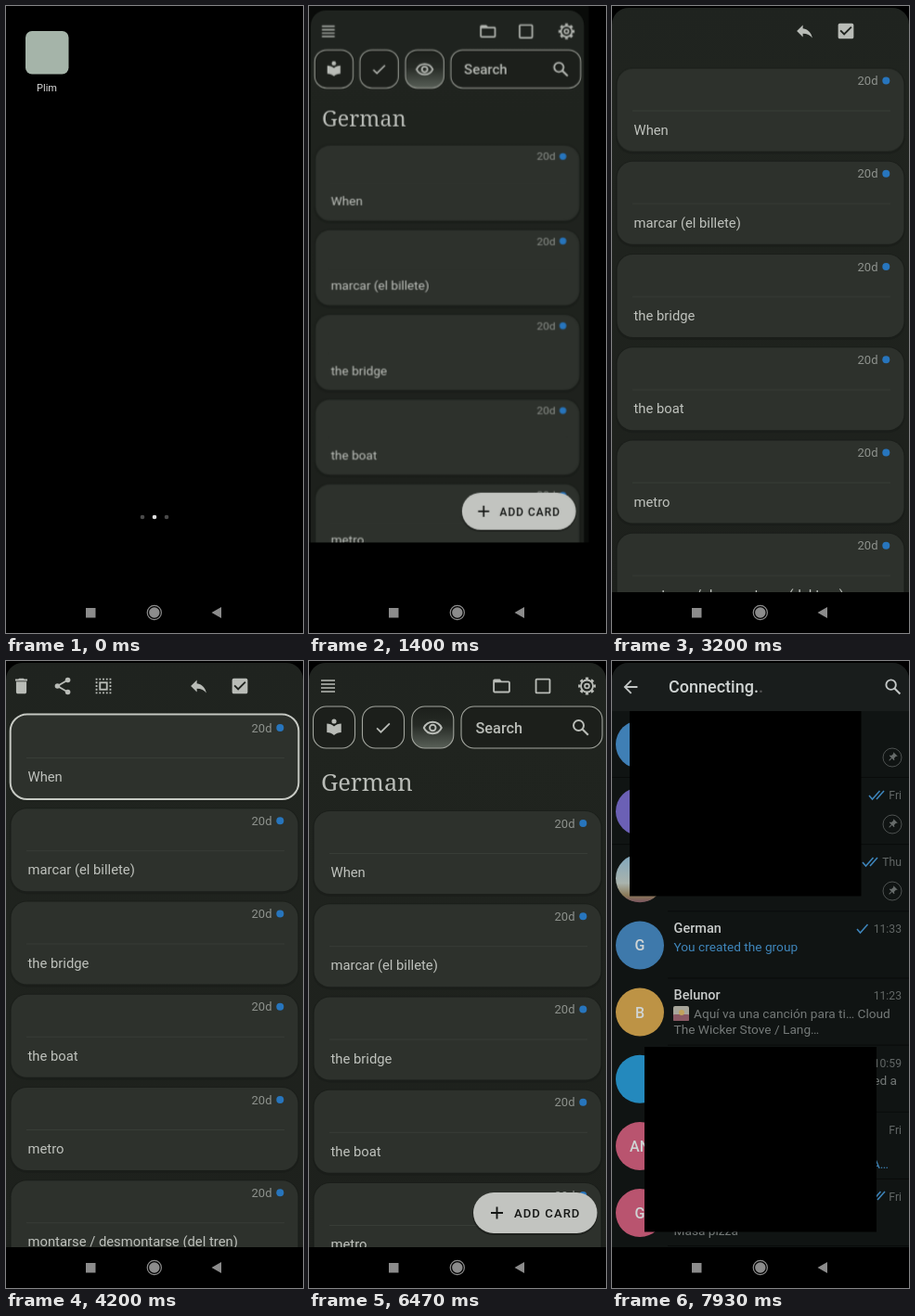
Write an HTML page that moves like this. It is 320 by 676 pixels and loops after 8000 ms.

```html
<!DOCTYPE html>
<html lang="en">
<head>
<meta charset="utf-8">
<title>Flashcards</title>
<style>
html, body { margin: 0; width: 100%; height: 100%; overflow: hidden; background: #000; }
svg { display: block; width: 100%; height: 100%; font-family: Roboto, sans-serif; }

/* 1% of the loop is 80 ms */
.a { animation: 8s linear infinite both; }
#home { transform-origin: 160px 338px; animation-name: home; }
#launcher { animation-name: launcher; }
#app { animation-name: open; }
#frame { animation-name: frame; }
.rule { animation-name: rule; }
#list { animation-name: scroll; animation-timing-function: ease-in-out; }
#header { animation-name: header; }
#selectBar { animation-name: selectBar; }
#actions, #pick0 { animation-name: first; }
#pick1 { animation-name: second; }
#scrim { animation-name: scrim; }
#sheet { animation-name: sheet; }
#shareItems { animation-name: items; }
#masks { animation-name: masks; }
#chat { animation-name: chat; }
#launchTap { animation-name: launchTap; }
.tap { opacity: 0; animation: tap 8s linear infinite; }

@keyframes home {
  0%, 11.6% { transform: scale(1); opacity: 1; }
  14.1% { transform: scale(.915); opacity: .68; }
  20%, 100% { transform: scale(.88); opacity: 0; }
}
@keyframes launcher { 0%, 11.6% { opacity: 1; } 12.4%, 100% { opacity: 0; } }
@keyframes open {
  0%, 11.6% { transform: translate(22px, 28px) scale(.14, .073); opacity: 0; }
  12.4% { opacity: 1; }
  14.1% { transform: translate(7.8px, 11.2px) scale(.66, .622); animation-timing-function: ease-out; }
  20%, 100% { transform: translate(0, 0) scale(1, 1); opacity: 1; }
}
@keyframes frame { 0%, 14.2% { opacity: 1; } 20%, 100% { opacity: 0; } }
@keyframes rule { 0%, 23.4% { opacity: .3; } 29%, 100% { opacity: 1; } }
@keyframes scroll {
  0%, 34.5% { transform: translateY(0); }
  41.4%, 74.6% { transform: translateY(-103px); }
  80%, 100% { transform: translateY(0); }
}
@keyframes header {
  0%, 34% { opacity: 1; }
  37.5%, 76% { opacity: 0; }
  80%, 100% { opacity: 1; }
}
@keyframes selectBar { 0%, 35% { opacity: 0; } 39%, 74.6% { opacity: 1; } 77%, 100% { opacity: 0; } }
@keyframes first { 0%, 49.2% { opacity: 0; } 52.2%, 74.3% { opacity: 1; } 76%, 100% { opacity: 0; } }
@keyframes second { 0%, 61.7% { opacity: 0; } 65.5%, 74.3% { opacity: 1; } 76%, 100% { opacity: 0; } }
@keyframes scrim { 0%, 81.6% { opacity: 0; } 84.1%, 100% { opacity: .62; } }
@keyframes sheet {
  0%, 81.6% { transform: translateY(325px); animation-timing-function: ease-out; }
  84.1%, 100% { transform: translateY(0); }
}
@keyframes items { 0%, 85% { opacity: 0; } 88.8%, 100% { opacity: 1; } }
@keyframes masks { 0%, 85% { opacity: 0; } 87.5%, 100% { opacity: 1; } }
@keyframes chat {
  0%, 93.4% { opacity: 0; transform: translateY(24px); animation-timing-function: ease-out; }
  98.8%, 100% { opacity: 1; transform: translateY(0); }
}
@keyframes launchTap { 0%, .8% { opacity: 0; } 2.5%, 14.2% { opacity: 1; } 16%, 100% { opacity: 0; } }
@keyframes tap { 0% { opacity: 0; } .6%, 1.8% { opacity: .8; } 3%, 100% { opacity: 0; } }
</style>
</head>
<body>
<svg id="stage" viewBox="0 0 320 676" preserveAspectRatio="none"></svg>
<script>
const INK = '#b9bcb7';

const rect = (x, y, w, h, r, fill, extra = '') =>
  `<rect x="${x}" y="${y}" width="${w}" height="${h}" rx="${r}" fill="${fill}" ${extra}/>`;
const disc = (x, y, r, fill, extra = '') =>
  `<circle cx="${x}" cy="${y}" r="${r}" fill="${fill}" ${extra}/>`;
const line = (d, stroke, width, extra = '') =>
  `<path d="${d}" fill="none" stroke="${stroke}" stroke-width="${width}" ${extra}/>`;
const label = (text, x, y, size, fill, extra = '') =>
  `<text x="${x}" y="${y}" font-size="${size}" fill="${fill}" ${extra}>${text}</text>`;
const END = 'text-anchor="end"';
const MIDDLE = 'text-anchor="middle"';
const BOLD = 'font-weight="500"';

// Icons live on a 24-unit grid and inherit their colour.
const fill = d => `<path d="${d}"/>`;
const pen = 'currentColor';
const icons = {
  folder: fill('M20 6h-8l-2-2H4c-1.1 0-2 .9-2 2v12c0 1.1.9 2 2 2h16c1.1 0 2-.9 2-2V8c0-1.1-.9-2-2-2zm0 12H4V8h16z'),
  box: rect(4, 4, 16, 16, 1, 'none', `stroke="${pen}" stroke-width="2"`),
  checked: fill('M19 3H5c-1.1 0-2 .9-2 2v14c0 1.1.9 2 2 2h14c1.1 0 2-.9 2-2V5c0-1.1-.9-2-2-2zm-9 14l-5-5 1.4-1.4 3.6 3.6 7.6-7.6L19 8z'),
  gear: disc(12, 12, 7, 'none', `stroke="${pen}" stroke-width="2"`) +
    disc(12, 12, 8.8, 'none', `stroke="${pen}" stroke-width="2.6" pathLength="64" stroke-dasharray="4 4" stroke-dashoffset="2"`) +
    disc(12, 12, 2.6, 'none', `stroke="${pen}" stroke-width="1.9"`),
  book: fill('M12 11.5C9.6 9.3 6.5 8 3 8v11c3.5 0 6.6 1.3 9 3.5 2.4-2.2 5.5-3.5 9-3.5V8c-3.5 0-6.6 1.3-9 3.5z') + disc(12, 5, 3, pen),
  check: line('M4 12.5l5 5L20 6.5', pen, 2),
  eye: line('M2 12C4 7.8 7.700 5.500 12 5.500S20 7.800 22 12C20 16.200 16.300 18.500 12 18.500S4 16.200 2 12z', pen, 2) +
    disc(12, 12, 3.4, 'none', `stroke="${pen}" stroke-width="2"`),
  search: disc(9.5, 9.5, 5.5, 'none', `stroke="${pen}" stroke-width="2"`) + line('M13.500 13.500L19.800 19.800', pen, 2.2),
  trash: fill('M6 19c0 1.1.9 2 2 2h8c1.1 0 2-.9 2-2V7H6zM19 4h-3.500l-1-1h-5l-1 1H5v2h14z'),
  share: line('M18 5L6 12l12 7', pen, 2) + disc(18, 5, 3, pen) + disc(6, 12, 3, pen) + disc(18, 19, 3, pen),
  selectAll: rect(4, 4, 16, 16, 0, 'none', `stroke="${pen}" stroke-width="2" stroke-dasharray="2 2" stroke-dashoffset="1"`) +
    rect(8, 8, 8, 8, 0, 'none', `stroke="${pen}" stroke-width="2"`),
  reply: fill('M10 9V5l-7 7 7 7v-4.1c5 0 8.500 1.600 11 5.100-1-5-4-10-11-11z'),
  pin: `<g transform="rotate(45 12 12)">${fill('M16 9V4h1a1 1 0 0 0 0-2H7a1 1 0 0 0 0 2h1v5c0 1.700-1.300 3-3 3v2h6v7l1 1 1-1v-7h6v-2c-1.700 0-3-1.300-3-3z')}</g>`,
  back: fill('M20 11H7.800l5.600-5.600L12 4l-8 8 8 8 1.400-1.400L7.800 13H20z'),
};
const icon = (name, x, y, scale = .93, color = INK) =>
  `<g transform="translate(${x} ${y}) scale(${scale}) translate(-12 -12)" fill="${color}" color="${color}">${icons[name]}</g>`;

const touch = disc(0, 0, 15, '#fff', 'opacity=".12"') + disc(0, 0, 9.5, '#dfe3df', 'opacity=".62"');
const tap = (x, y, ms) =>
  `<g transform="translate(${x} ${y})"><g class="tap" style="animation-delay:${ms}ms">${touch}</g></g>`;

function home() {
  const dots = [147, 160, 173].map((x, i) => disc(x, 551, 2.3, i === 1 ? '#dedede' : '#4a4a4a')).join('');
  return `<g id="home" class="a">${dots}<g id="launcher" class="a">` +
    rect(21, 27, 46.5, 46.5, 7, '#a5b4a9') + label('Plim', 44, 92, 11, '#d8d8d8', MIDDLE) + '</g></g>';
}

function card(text, i) {
  const y = 162 + i * 100.25;
  const pick = i < 2
    ? `<g id="pick${i}" class="a">${rect(4.7, y - 1.5, 310.6, 91.5, 18, 'none', 'stroke="#c6c9c3" stroke-width="2"')}</g>` : '';
  return rect(4, y - 1, 312, 93, 19, '#191c18', 'opacity=".55"') +
    rect(5.5, y, 309, 89, 17, '#2d312c') +
    `<g class="rule a">${line(`M22 ${y + 45.5}H300`, '#383d37', 1)}</g>` +
    label('20d', 286.5, y + 17.5, 13, '#8e928d', END) + disc(295.3, y + 13, 4, '#2775bd') +
    label(text, 23.5, y + 71, 14.8, '#bfc2bd') + pick;
}

function header() {
  const menu = [21, 25, 29, 33].map(y => `M13 ${y}H28`).join('');
  const border = 'stroke="#a3a69f" stroke-width="1.1"';
  return '<g id="header" class="a">' + line(menu, INK, 1.5) +
    icon('folder', 207.5, 27) + icon('box', 252, 27) + icon('gear', 299.500, 27) +
    [4.5, 57.5, 110.8].map((x, i) => rect(x, 49, 45, 45, 14, i === 2 ? 'url(#glow)' : '#1c1f1b', border)).join('') +
    icon('book', 27, 71, .86) + icon('check', 80, 72, .86) + icon('eye', 133.300, 72, .95) +
    rect(164, 49, 152, 45, 14, '#1c1f1b', border) +
    label('Search', 179.5, 77.5, 16.3, INK, BOLD) + icon('search', 293, 72, 1) +
    label('German', 13, 139.5, 25.5, INK, 'font-family="\'Noto Serif\', serif" font-weight="300"') +
    rect(176, 574, 135, 45, 22.5, '#000', 'opacity=".3"') + rect(177, 573, 133.5, 44, 22, '#c2c4c0') +
    line('M196 595H209M202.500 588.500V601.500', '#151715', 1.9) +
    label('ADD CARD', 221, 600, 13.1, '#151715', BOLD + ' letter-spacing="1.05"') + '</g>';
}

function app() {
  const words = ['When', 'marcar (el billete)', 'the bridge', 'the boat', 'metro', 'montarse / desmontarse (del tren)'];
  return '<g id="app" class="a" clip-path="url(#window)">' +
    `<g id="frame" class="a">${rect(-6, -15, 332, 680, 16, '#171a16')}</g>` +
    rect(0, 2, 320, 660, 18, 'url(#wall)') +
    `<g id="list" class="a">${words.map(card).join('')}</g>` + header() +
    '<g id="selectBar" class="a">' + icon('reply', 207.500, 27) + icon('checked', 252, 27) +
    `<g id="actions" class="a">${icon('trash', 16.500, 27)}${icon('share', 61, 27)}${icon('selectAll', 105, 27)}</g></g></g>`;
}

function shareSheet() {
  const tile = (x, y, color) => rect(x - 20.5, y - 20.5, 41, 41, 10, color);
  const name = (text, x, y, anchor = '') => label(text, x, y, 11, '#9da2a3', anchor);
  return `<g id="scrim" class="a">${rect(0, 0, 320, 632, 0, '#000')}</g>` +
    '<g clip-path="url(#window)"><g id="sheet" class="a">' + rect(0, 310, 320, 345, 20, '#171b1d') +
    '<g id="shareItems" class="a">' + label('Share', 160, 351, 15.5, '#cfd3d4', BOLD + ' ' + MIDDLE) +
    tile(45.5, 392, '#d6d8d9') + disc(45.5, 392, 11, '#2b6fc4') +
    tile(121.3, 392, '#d6d8d9') + disc(121.3, 392, 17.5, '#2f9fd6') +
    tile(197, 392, '#d6d8d9') + rect(184, 379, 26, 26, 3, '#d99a45') +
    tile(273, 392, '#2fb646') +
    tile(45.5, 475.500, '#d6d8d9') + rect(30, 461, 30, 30, 2, '#eeb02c') +
    tile(273, 475.500, '#d6d8d9') + disc(273, 476, 15, '#2f7fe0') +
    name('Nimbus', 28.5, 432) + name('Send', 31.5, 444) + name('OurApp', 298, 432, END) +
    name('Copy', 23, 515) + name('Note', 287.5, 515, END) +
    rect(19, 565, 282, 42, 21, '#2a2d2c') + '</g></g></g>';
}

function chat() {
  const BLUE = '#3e86bd', GREY = '#626766', NAME = '#c9cccb';
  const avatars = [['#3f7fb5', ''], ['#6b60b5', ''], ['url(#photo)', ''], ['#3e79ab', 'G'],
    ['#bd9345', 'B'], ['#2489bd', ''], ['#b9546f', 'AN'], ['#b9546f', 'G']];
  const rows = avatars.map(([color, initials], i) => {
    const y = 90 + i * 72.15;
    return disc(30, y, 26, color) + label(initials, 30, y + 6, 16, '#cfd4d4', BOLD + ' ' + MIDDLE) +
      line(`M${i < 2 ? 0 : 60} ${y + 35.500}H320`, '#090b0a', 1);
  }).join('');
  const pins = [104, 176, 248].map(y =>
    disc(302, y, 10, 'none', 'stroke="#4d5150"') + icon('pin', 302, y, .5, '#666b6a')).join('');
  const tick = (x, y) => line(`M${x} ${y}l3.500 4 8-9`, BLUE, 1.5);
  const ticks = (x, y) => tick(x, y) + line(`M${x + 8} ${y + 4}l8-9`, BLUE, 1.5);
  const time = (text, y) => label(text, 312, y, 12.2, GREY, END);
  const note = (text, x, y, color = '#747978', extra = '') => label(text, x, y, 13.7, color, extra);
  return '<g clip-path="url(#window)"><g id="chat" class="a">' + rect(0, 2, 320, 680, 18, '#101413') +
    `<path d="M0 54V20a18 18 0 0 1 18-18H302a18 18 0 0 1 18 18V54z" fill="#191d1c"/>` +
    icon('back', 20, 28, .93, '#c3c7c6') + icon('search', 303, 28, .95, '#c3c7c6') +
    label('Connecting.<tspan fill="#555">.</tspan>', 61, 34, 18, '#d0d4d3', BOLD) +
    rows + pins + ticks(277, 145) + ticks(270, 217) + ticks(278, 577) + tick(264, 289) +
    time('Fri', 149) + time('Thu', 221) + time('11:33', 293) + time('11:23', 365) +
    time('10:59', 438) + time('Fri', 510) + time('Fri', 582) +
    label('German', 66.500, 293, 14.5, NAME, BOLD) + note('You created the group', 66.500, 313, '#3f86bb') +
    label('Belunor', 66.500, 365, 14.5, NAME, BOLD) +
    rect(66, 372, 17, 16, 2, '#a7a59a') + rect(66, 381, 17, 7, 1, '#8a5964') + disc(75, 379, 3, '#c1a25c') +
    note('Aquí va una canción para ti… Cloud', 88, 385) + note('The Wicker Stove / Lang…', 66.500, 402) +
    note('ed a', 307, 457, '#747978', END) + note('A…', 298, 547, '#3f86bb', END) +
    note('Masa pizza', 66.500, 619) + '</g></g>';
}

const stop = (offset, color) => `<stop offset="${offset}" stop-color="${color}"/>`;
const gradient = (id, ...stops) => `<linearGradient id="${id}" x2="0" y2="1">${stops.join('')}</linearGradient>`;

document.getElementById('stage').innerHTML =
  '<defs>' +
  gradient('wall', stop(0, '#1f231f'), stop(.12, '#20241f'), stop(1, '#1d201c')) +
  gradient('glow', stop(0, '#1c1f1b'), stop(.45, '#262a25'), stop(1, '#596058')) +
  gradient('photo', stop(0, '#7fa6bd'), stop(.6, '#a9b3ad'), stop(.85, '#8b7a58'), stop(1, '#7a5560')) +
  `<clipPath id="window">${rect(-6, -15, 332, 647, 0, '#000')}</clipPath></defs>` +
  rect(0, 0, 320, 676, 0, '#000') + home() + app() + shareSheet() + chat() +
  `<g id="masks" class="a">${rect(19, 54, 249.5, 199.5, 0, '#000')}${rect(35, 416, 250, 199.5, 0, '#000')}</g>` +
  rect(86, 649, 10.5, 10.5, 0, '#8c8c8c') +
  disc(159.8, 654, 7.6, 'none', 'stroke="#8c8c8c" stroke-width="1.2"') + disc(159.8, 654, 5.7, '#8c8c8c') +
  '<path d="M221.500 654L232 648V660z" fill="#8c8c8c"/>' +
  `<g transform="translate(45 48)"><g id="launchTap" class="a">${touch}</g></g>` +
  tap(252, 27, 2640) + tap(150, 105, 3930) + tap(150, 205, 4940) + tap(61, 27, 5930) + tap(121, 392, 7470);
</script>
</body>
</html>
```
